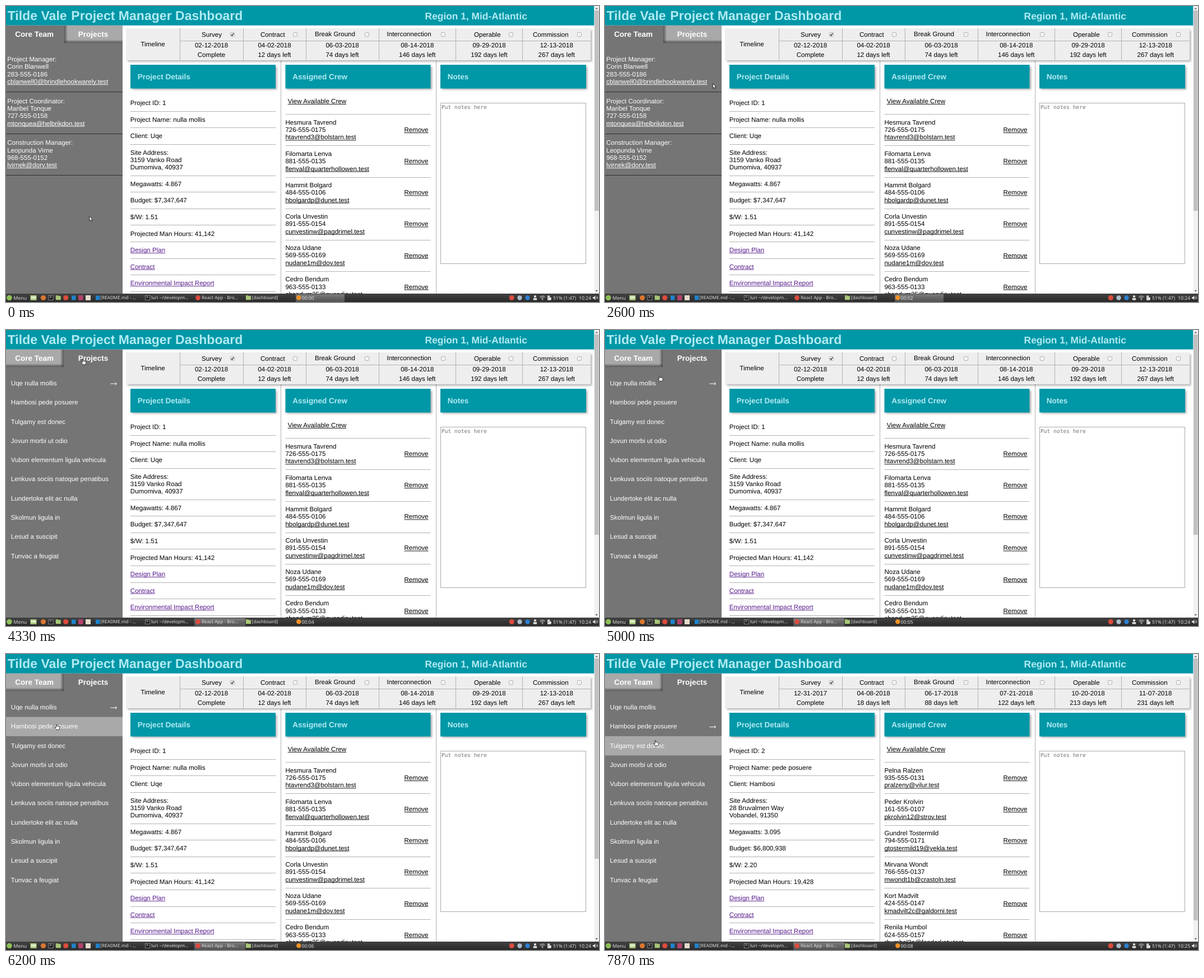
An HTML page with a canvas for the animation above (8 s loop, 1058 by 529 pixels).

```html
<!DOCTYPE html>
<html lang="en">
<head>
<meta charset="utf-8">
<title>Project dashboard</title>
<style>
  html, body { margin: 0; width: 100%; height: 100%; overflow: hidden; background: #fff; }
  canvas { display: block; width: 100vw; height: 100vh; }
</style>
</head>
<body>
<canvas id="stage" width="1058" height="529"></canvas>
<script>
const ctx = document.getElementById('stage').getContext('2d');
const LOOP = 8000, STEPS_PER_MS = 0.015;
const TEAL = '#0097a7', PALE = '#b2ebf2', GREY = '#757575', LIGHT = '#a9a9a9', RULE = '#b2b2b2';
const SANS = '"Liberation Sans", Arial, sans-serif';
const BODY = `11.57px ${SANS}`, HEAD = `bold 13.54px ${SANS}`;
const BAR = '8.15px "Noto Sans", sans-serif', BAR_BIG = '8.7px "Noto Sans", sans-serif';

const team = [
  ['Project Manager:', 'Corin Blanwell', '283-555-0186', 'cblanwell0@brindlehookwarely.test'],
  ['Project Coordinator:', 'Maribel Tonque', '727-555-0158', 'mtonquea@helbrikdon.test'],
  ['Construction Manager:', 'Leopunda Virne', '968-555-0152', 'lvirnek@dorv.test'],
];

const projectNames = [
  'Uqe nulla mollis', 'Hambosi pede posuere', 'Tulgamy est donec', 'Jovun morbi ut odio',
  'Vubon elementum ligula vehicula', 'Lenkuva sociis natoque penatibus', 'Lundertoke elit ac nulla',
  'Skolmun ligula in', 'Lesud a suscipit', 'Tunvac a feugiat',
];

const projects = [
  {
    thumbEnd: 366,
    dates: ['02-12-2018', '04-02-2018', '06-03-2018', '08-14-2018', '09-29-2018', '12-13-2018'],
    days: [0, 12, 74, 146, 192, 267],
    details: ['Project ID: 1', 'Project Name: nulla mollis', 'Client: Uqe',
      ['Site Address:', '3159 Vanko Road', 'Dumomiva, 40937'],
      'Megawatts: 4.867', 'Budget: $7,347,647', '$/W: 1.51', 'Projected Man Hours: 41,142'],
    crew: [
      ['Hesmura Tavrend', '726-555-0175', 'htavrend3@bolstarn.test'],
      ['Filomarta Lenva', '881-555-0135', 'flenval@quarterhollowen.test'],
      ['Hammit Bolgard', '484-555-0106', 'hbolgardp@dunet.test'],
      ['Corla Unvestin', '891-555-0154', 'cunvestinw@pagdrimel.test'],
      ['Noza Udane', '569-555-0169', 'nudane1m@dov.test'],
      ['Cedro Bendum', '963-555-0133', 'cbendum25@quandirv.test'],
    ],
  },
  {
    thumbEnd: 476,
    dates: ['12-31-2017', '04-08-2018', '06-17-2018', '07-21-2018', '10-20-2018', '11-07-2018'],
    days: [0, 18, 88, 122, 213, 231],
    details: ['Project ID: 2', 'Project Name: pede posuere', 'Client: Hambosi',
      ['Site Address:', '28 Bruvalmen Way', 'Vobandel, 91350'],
      'Megawatts: 3.095', 'Budget: $6,800,938', '$/W: 2.20', 'Projected Man Hours: 19,428'],
    crew: [
      ['Pelna Ralzen', '935-555-0131', 'pralzeny@vilur.test'],
      ['Peder Krolvin', '161-555-0107', 'pkrolvin12@strov.test'],
      ['Gundrel Tostermild', '794-555-0171', 'gtostermild19@vekla.test'],
      ['Mirvana Wondt', '766-555-0137', 'mwondt1b@crastoln.test'],
      ['Kort Madvilt', '424-555-0147', 'kmadvilt2c@galdorni.test'],
      ['Renila Humbol', '624-555-0157', 'rhumbol2o@fendarkoty.test'],
    ],
  },
];

// name, column left edge, label x, checkbox centre
const stages = [
  ['Survey', 310, 349, 403.5], ['Contract', 423, 454, 516], ['Break Ground', 535, 551, 644],
  ['Interconnection', 665, 679.5, 780], ['Operable', 802.5, 835, 901], ['Commission', 921.5, 940, 1022.5],
];

// pointer path: time, x, y
const path = [
  [0, 148.5, 375], [200, 148.5, 375], [400, 160, 383], [733, 172, 312], [1000, 172, 312],
  [1533, 178, 248.5], [1867, 188, 211], [2333, 204, 152], [2400, 204, 152], [3267, 152, 92],
  [3400, 142.5, 76], [3667, 142.5, 76], [3733, 142.5, 69.5], [3867, 138, 52], [4667, 138, 52],
  [5000, 98.5, 81.5], [5400, 95, 99], [5533, 95, 99], [5867, 89.5, 109], [6200, 91, 125.5],
  [6800, 91, 125.5], [7067, 91, 140], [7267, 91, 140], [7533, 91, 156], [7800, 91, 156],
  [7867, 91, 154], [LOOP, 91, 154],
];
const HAND_AT = 3790, TAB_AT = 4260, HOVER_AT = 5060, SELECT_AT = 6590, MINUTE_AT = 7660;
const ticks = [1060, 1990, 3320, 3790, 4925, 5860, 6860, 7860];

function rect(x, y, w, h, color) {
  ctx.fillStyle = color;
  ctx.fillRect(x, y, w, h);
}

function dot(x, y, r, color) {
  ctx.fillStyle = color;
  ctx.beginPath();
  ctx.arc(x, y, r, 0, 7);
  ctx.fill();
}

function trace(points) {
  ctx.beginPath();
  for (let i = 0; i < points.length; i += 2) ctx.lineTo(points[i], points[i + 1]);
}

function line(points, color, width) {
  trace(points);
  ctx.strokeStyle = color;
  ctx.lineWidth = width;
  ctx.stroke();
}

function poly(points, fill, outline) {
  trace(points);
  ctx.closePath();
  ctx.fillStyle = fill;
  ctx.fill();
  if (!outline) return;
  ctx.strokeStyle = outline;
  ctx.lineWidth = 0.8;
  ctx.stroke();
}

function text(str, x, y, color = '#000', font = BODY, align = 'left') {
  ctx.font = font;
  ctx.textAlign = align;
  ctx.fillStyle = color;
  ctx.fillText(str, x, y);
}

function link(str, x, y, color = '#000') {
  text(str, x, y, color);
  rect(x, y + 1.1, ctx.measureText(str).width, 0.9, color);
}

function gradient(x0, y0, x1, y1, from, to) {
  const g = ctx.createLinearGradient(x0, y0, x1, y1);
  g.addColorStop(0, from);
  g.addColorStop(1, to);
  return g;
}

function raised(x, y, w, h, color) {
  ctx.save();
  ctx.shadowColor = 'rgba(0,0,0,.32)';
  ctx.shadowOffsetX = ctx.shadowOffsetY = 2.5;
  ctx.shadowBlur = 3.5;
  rect(x, y, w, h, color);
  ctx.restore();
}

function header() {
  rect(0, 0, 1049.5, 34.7, TEAL);
  const font = `bold 23.05px ${SANS}`;
  text('Tilde Vale', 2.7, 24.6, PALE, font);
  text('Project Manager Dashboard', 116.3, 24.6, PALE, font);
  text('Region 1, Mid-Atlantic', 747.6, 24, PALE, `bold 17.36px ${SANS}`);
}

function scrollbar(thumbEnd) {
  rect(1049.5, 0, 8.5, 514, '#f1f1f1');
  rect(1050, 8, 7.5, thumbEnd - 8, '#c1c1c1');
  poly([1051.5, 5.5, 1056, 5.5, 1053.7, 3], '#555');
  poly([1051.5, 508, 1056, 508, 1053.7, 510.5], '#555');
}

function sunkenTab(x, w, shadeX, shadeEnd) {
  const dark = 'rgba(60,60,60,.75)', clear = 'rgba(60,60,60,0)';
  rect(x, 35, w, 31, LIGHT);
  rect(x, 60, w, 6, gradient(0, 66, 0, 60, dark, clear));
  rect(Math.min(shadeX, shadeEnd), 35, 6, 31, gradient(shadeX, 0, shadeEnd, 0, dark, clear));
}

function sidebar(showProjects, selected, hovered) {
  rect(0, 34.7, 208, 479.3, GREY);
  if (showProjects) sunkenTab(0, 103, 103, 97);
  else sunkenTab(104, 104, 104, 110);
  text('Core Team', 16.2, 55, '#fff', HEAD);
  text('Projects', 128.8, 55, '#fff', HEAD);

  if (!showProjects) {
    team.forEach((rows, g) => {
      const top = 99 + g * 74.6;
      rows.forEach((row, i) => (i === 3 ? link : text)(row, 2.2, top + i * 13.3, '#fff'));
      rect(0, Math.round(top + 54), 208, 1, '#303030');
    });
    return;
  }
  projectNames.forEach((name, i) => {
    const top = 78.3 + i * 34.3, mid = top + 17.7;
    if (i === hovered) rect(0, top, 208, 34.3, LIGHT);
    text(name, 8.8, top + 20.6, '#fff');
    if (i === selected) {
      line([186.5, mid, 197.5, mid], '#fff', 1);
      line([194.8, mid - 2.4, 197.5, mid, 194.8, mid + 2.4], '#fff', 1);
    }
  });
}

function timeline({ dates, days }) {
  raised(214, 40, 829, 57, '#eee');
  text('Timeline', 262, 72, '#000', BODY, 'center');
  rect(310, 62, 733, 1, RULE);
  stages.forEach(([name, left, labelX, boxX], i) => {
    const right = i < 5 ? stages[i + 1][1] : 1043;
    const mid = (left + right) / 2, dip = i === 2 || i === 3 ? 0.6 : 0;
    rect(Math.floor(left), 40, 1, 57, RULE);
    text(name, labelX, 55 - dip);
    ctx.beginPath();
    ctx.roundRect(Math.round(boxX) - 3.5, 47.5, 7, 7, 1);
    ctx.fillStyle = '#f4f4f4';
    ctx.fill();
    ctx.strokeStyle = '#b0b0b0';
    ctx.lineWidth = 1;
    ctx.stroke();
    text(dates[i], mid, 74.2, '#000', BODY, 'center');
    text(i ? `${days[i]} days left` : 'Complete', mid, 90.6 + dip, '#000', BODY, 'center');
  });
  line([401.7, 51, 403.4, 52.8, 406.3, 48.8], '#333', 1.4);
}

function card(title, x, w) {
  raised(x, 105, w, 42.5, TEAL);
  text(title, x + 12.8, 130.5, PALE, HEAD);
}

function details(entries) {
  card('Project Details', 222, 259);
  let y = 177;
  const endRow = () => {
    rect(222, Math.floor(y + 11), 259, 1, RULE);
    y += 29.56;
  };
  for (const entry of entries) {
    [].concat(entry).forEach((row, i) => {
      if (i) y += 13.3;
      text(row, 221.8, y);
    });
    endRow();
  }
  for (const name of ['Design Plan', 'Contract', 'Environmental Impact Report']) {
    link(name, 221.8, y, '#551a8b');
    endRow();
  }
}

function crew(members) {
  card('Assigned Crew', 498.5, 259);
  link('View Available Crew', 502.7, 174);
  members.forEach(([name, phone, email], i) => {
    const y = 211.7 + i * 56.1;
    rect(498.5, Math.round(y - 18.4), 259, 1, RULE);
    text(name, 498.4, y);
    text(phone, 498.4, y + 13.3);
    link(email, 498.4, y + 26.7);
    link('Remove', 710.5, y + 13.4);
  });
}

function notes() {
  card('Notes', 775, 260);
  ctx.strokeStyle = LIGHT;
  ctx.lineWidth = 1;
  ctx.strokeRect(775.5, 173.5, 259, 287);
  text('Put notes here', 777, 184, GREY, '9.6px "DejaVu Sans Mono", monospace');
}

function terminalIcon(x) {
  rect(x - 4.5, 517, 9, 9, '#999');
  rect(x - 3.7, 517.8, 7.4, 7.4, '#222');
  text('>', x - 2.8, 523.2, '#eee', BAR);
}

function folderIcon(x) {
  rect(x - 4.5, 517, 4.5, 3, '#8fae5c');
  rect(x - 4.5, 518.2, 9, 7, '#a8c878');
}

function taskbar(browserActive, seconds, minute) {
  rect(0, 514, 1058, 15, gradient(0, 514, 0, 529, '#424242', '#292929'));
  const [x, w] = browserActive ? [336, 91] : [517, 87];
  rect(x, 515, w, 14, gradient(0, 515, 0, 529, '#7b7b7b', '#515151'));

  const ink = '#e0e0e0';
  dot(6, 521.5, 4.8, '#8fc05a');
  text('Menu', 13.5, 524.6, ink, BAR_BIG);
  rect(43.5, 517, 11, 9, '#a8c878');
  rect(44.5, 519, 9, 4, '#e2ecd2');
  dot(66.5, 521.5, 4.6, '#d9772f');
  terminalIcon(80);
  folderIcon(93.3);
  dot(106.7, 521.5, 4.6, '#dc4b3e');
  rect(117, 517.5, 7.5, 8, '#1f83c9');
  rect(129, 517, 8.5, 9, '#b3416b');
  rect(142, 517, 9, 9, '#e3dccb');

  rect(160, 517.5, 7.5, 8, '#1f83c9');
  text('[README.md - ...', 168.5, 524.4, ink, BAR);
  terminalIcon(252.5);
  text('luri ~/developm...', 259, 524.4, ink, BAR);
  dot(342.5, 521.5, 4.4, '#dc4b3e');
  text('React App - Bro...', 349, 524.4, ink, BAR);
  folderIcon(432.5);
  text('[dashboard]', 438.8, 524.4, ink, BAR);
  dot(522.3, 521.3, 4.2, '#ee9126');
  text(`00:0${seconds}`, 527.6, 524.6, ink, BAR_BIG);

  dot(902.3, 521.5, 4.5, '#dc4b3e');
  dot(916.5, 521.5, 4.2, '#aebccb');
  dot(930.5, 521.5, 4.2, '#2f7fd0');
  dot(944, 519.2, 2.1, '#ddd');
  rect(940.8, 522, 6.4, 3.6, '#ddd');
  ctx.strokeStyle = '#ccc';
  ctx.lineWidth = 1;
  for (const r of [2.4, 4.6, 6.8]) {
    ctx.beginPath();
    ctx.arc(957, 525, r, -2.4, -0.75);
    ctx.stroke();
  }
  dot(957, 524.7, 1, '#ccc');
  rect(966, 518, 4.5, 8, '#ccc');
  rect(967.2, 517, 2, 1, '#ccc');
  rect(969.5, 521, 3.2, 4.5, '#eee');
  text('51% (1:47)', 976, 524.6, ink, '8.5px "Noto Sans", sans-serif');
  text(`10:2${minute}`, 1022, 524.6, ink, BAR_BIG);
  poly([1047, 520, 1049, 520, 1051.5, 517.5, 1051.5, 525.5, 1049, 523, 1047, 523], '#ddd');
  for (const r of [2.2, 4]) {
    ctx.beginPath();
    ctx.arc(1051.5, 521.5, r, -0.8, 0.8);
    ctx.stroke();
  }
}

function pointerAt(t) {
  const i = Math.max(1, path.findIndex(p => p[0] >= t));
  const [t0, x0, y0] = path[i - 1], [t1, x1, y1] = path[i];
  const k = (t - t0) / (t1 - t0);
  return [x0 + (x1 - x0) * k, y0 + (y1 - y0) * k];
}

function pointer(x, y, hand) {
  ctx.save();
  ctx.translate(x, y);
  ctx.lineJoin = 'round';
  if (hand) {
    poly([-1.8, 0.6, -0.6, 0.6, -0.2, 3.4, 3.6, 4, 4.8, 5.2, 4.4, 8, 3.6, 9.8, -1.2, 9.8,
      -3.6, 6.6, -3.4, 5.6, -1.8, 6.2], '#fff', '#111');
  } else {
    poly([0.5, 0.6, 0.5, 8.8, 2.3, 7.2, 3.6, 10.2, 5, 9.6, 3.8, 6.7, 6, 6.5], '#fff', '#111');
  }
  ctx.restore();
}

function draw(t) {
  const [x, y] = pointerAt(t);
  const selected = t >= SELECT_AT ? 1 : 0;
  const hovered = t >= HOVER_AT ? Math.floor((y - 78.3) / 34.3) : -1;
  const project = projects[selected];
  const clicked = t >= TAB_AT;

  rect(0, 0, 1058, 529, '#fff');
  rect(490, 97, 1, 417, RULE);
  rect(767, 97, 1, 417, RULE);
  header();
  scrollbar(project.thumbEnd);
  sidebar(clicked, selected, hovered);
  timeline(project);
  details(project.details);
  crew(project.crew);
  notes();
  taskbar(clicked, ticks.filter(tick => t >= tick).length, t >= MINUTE_AT ? 5 : 4);
  pointer(x, y, t >= HAND_AT);
}

ctx.textRendering = 'geometricPrecision';
const start = performance.now();

// The screen refreshes fifteen times a second.
function frame() {
  const t = (performance.now() - start) % LOOP;
  draw(Math.floor((t + 5) * STEPS_PER_MS) / STEPS_PER_MS % LOOP);
  requestAnimationFrame(frame);
}
frame();
</script>
</body>
</html>
```
